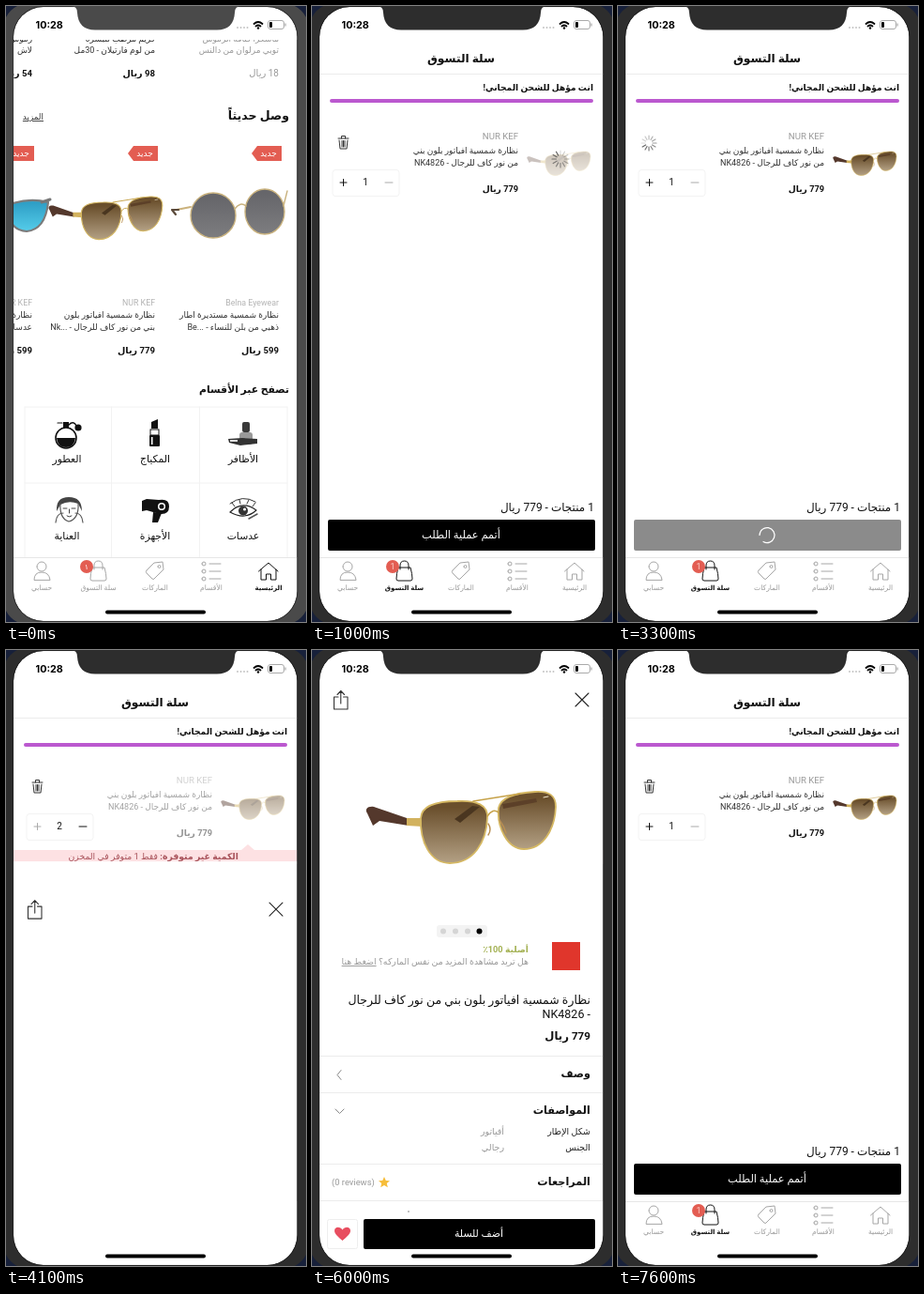
Recreate the animation shown at these times as an HTML page. Size 320 by 656 pixels, loop 8 s.

```html
<!DOCTYPE html>
<html lang="ar">
<head>
<meta charset="utf-8">
<title>سلة التسوق</title>
<style>
html, body { margin: 0; width: 100%; height: 100%; overflow: hidden; background: #2d2d2d; }
svg { display: block; width: 100vw; height: 100vh; }
text { font-family: Roboto, 'DejaVu Sans', sans-serif; direction: rtl; }
.ltr { direction: ltr; }
.end { text-anchor: end; }
.mid { text-anchor: middle; }
.b { font-weight: 700; }
.clock { font-family: Inter, sans-serif; font-weight: 700; }
.line { fill: none; stroke-linecap: round; stroke-linejoin: round; }
</style>
</head>
<body>
<svg id="stage" viewBox="0 0 320 656" fill="#111"></svg>
<script>
const LOOP = 8000;
const GREY = '#999', RED = '#e35d52', RULE = '#ececec';

// Right-aligned Arabic text unless a class says otherwise.
const text = (x, y, size, str, cls = '', fill = '#111') =>
  `<text x="${x}" y="${y}" font-size="${size}" class="${cls}" fill="${fill}">${str}</text>`;
const line = (d, color = '#111', width = 1) =>
  `<path class="line" d="${d}" stroke="${color}" stroke-width="${width}"/>`;
const shape = (d, fill) => `<path d="${d}" fill="${fill}"/>`;
const rect = (x, y, w, h, fill, r = 0, more = '') =>
  `<rect x="${x}" y="${y}" width="${w}" height="${h}" rx="${r}" fill="${fill}" ${more}/>`;
const circle = (x, y, r, fill, more = '') =>
  `<circle cx="${x}" cy="${y}" r="${r}" fill="${fill}" ${more}/>`;
const group = (id, body) => `<g id="${id}">${body}</g>`;

const gradient = (id, top, bottom) => `<linearGradient id="${id}" x1="0" y1="0" x2="0" y2="1">
  <stop offset=".1" stop-color="${top}"/><stop offset="1" stop-color="${bottom}"/></linearGradient>`;

function spinner(id, x, y, r) {
  let ticks = '';
  for (let i = 0; i < 12; i++) {
    ticks += `<path d="M0 ${-r * .5}V${-r}" stroke="#555" stroke-width="1.2" stroke-linecap="round"
      opacity="${.2 + .7 * i / 11}" transform="rotate(${i * 30})"/>`;
  }
  return `<g id="${id}"><g transform="translate(${x} ${y})"><g class="turn">${ticks}</g></g></g>`;
}

function aviator(x, y, scale) {
  const left = 'M116 178C117 164 134 160 155 160C176 159 188 164 187 178C186 204 172 226 147 226C126 226 115 203 116 178Z';
  const right = 'M199 167C202 155 220 151 238 150C253 149 260 154 260 166C259 190 247 211 226 211C208 211 197 187 199 167Z';
  const arms = shape('M104 179L66 166C59 165 56 169 59 173L65 186L72 181L103 186Z', '#54382c') +
    shape('M101 178L118 178V187L101 186Z', '#d2b25e');
  const lenses = [left, right].map(d => shape(d, 'url(#brown)')).join('');
  const inner = shape('M152 179L171 165L179 166L158 183Z', '#4a3620') +
    shape('M203 163L239 157L240 161L204 168Z', '#5c4028');
  const frame = [left, right].map(d => line(d, '#d5b863', 1.8)).join('') +
    line('M172 160L222 152M187 176Q193 167 199 172', '#c6a24a', 1.6) +
    line('M188 184Q192 190 188 196M200 180Q205 187 207 194', '#b98f52', 1.4) +
    line('M247 156L252 155', '#f4ead0', 1);
  return `<g transform="translate(${x} ${y}) scale(${scale}) translate(-57 -150)">${arms}${lenses}${inner}${frame}</g>`;
}

const roundGlasses = () =>
  line('M197 214L182 217', '#cbb27c', 1.8) + line('M184 217L177 217L181 222', '#5b4a3a', 2.2) +
  circle(221, 223, 24, 'url(#smoke)', 'stroke="#c9b27e" stroke-width="1.4"') +
  `<ellipse cx="276" cy="219" rx="21" ry="24" fill="url(#smoke)" stroke="#c9b27e" stroke-width="1.4"/>` +
  line('M244 216Q250 208 256 213M296 213L300 197', '#c9b27e', 1.4);

const blueGlasses = () =>
  shape('M4 212Q25 203 45 209Q42 238 22 240Q6 239 2 222Z', 'url(#sea)') +
  line('M4 211Q25 204 45 209Q42 238 22 240Q6 239 2 222', '#7c7b7b', 2.2) + line('M38 209L47 206', '#777', 3);

function tabs(active, badge) {
  const names = ['الرئيسية', 'الأقسام', 'الماركات', 'سلة التسوق', 'حسابي'];
  const icons = [
    'M269.5 602L280 593L290 602M272 600V611H277.5V605H282.5V611H288V600',
    'M209 594a2 2 0 1 0 4 0a2 2 0 1 0-4 0M209 602a2 2 0 1 0 4 0a2 2 0 1 0-4 0M209 610a2 2 0 1 0 4 0a2 2 0 1 0-4 0M217 594H229M217 602H229M217 610H229',
    'M150 601L158 593L167 592L168 600L158 610Q157 611 156 610L150 604Q148.5 602.5 150 601M162 597a1.5 1.5 0 1 0 3 0a1.5 1.5 0 1 0-3 0',
    'M92 598H105Q107 605 107 610Q107 612 105 612H92Q90 612 90 610Q90 605 92 598M94 600V596Q94 591 98.5 591T103 596V600',
    'M33 597a5 5 0 1 0 10 0a5 5 0 1 0-10 0M30 611Q30 603 38 603T47 611Z'];
  const items = names.map((name, i) => {
    const on = i === active, x = [280, 219, 159, 98.5, 38][i];
    return line(icons[i], on ? '#111' : '#a6a6a6') +
      text(x, 622, on ? 7 : 7.6, name, on ? 'mid b' : 'mid', on ? '#111' : GREY);
  }).join('');
  return rect(8, 587, 303, 69, '#fff') + rect(8, 587, 303, 1, '#e6e6e6') + items +
    circle(86, 597, 7, RED) + badge;
}

function categoryIcons() {
  const polish = rect(252, 443, 8, 11, '#3a3a3a', 2) + rect(249, 454, 14, 13, '#999', 3) +
    shape('M237 461L252 460L268 461V466L250 468L238 465Z', '#333') + rect(239, 462, 8, 2, '#ddd');
  const lipstick = shape('M155 450V443L162 440V450Z', '#111') + rect(154, 451, 9, 6, '#fff', 0, 'stroke="#111"') +
    rect(153, 457, 11, 12, '#111', 1) + rect(155, 459, 1.5, 8, '#fff');
  const perfume = circle(64, 460, 11, '#fff', 'stroke="#111" stroke-width="1.6"') +
    shape('M54 460H74Q73 470 64 470T54 460Z', '#111') + rect(61, 443, 6, 6, '#111') +
    line('M67 446Q72 441 75 447', '#111', 1.5) + circle(77, 449, 3.6, '#111') + line('M55 444H60', '#111', 1.2);
  const eye = line('M239 539Q252 526 267 537Q255 548 239 539', '#222', 1.2) + circle(253, 537.5, 5, '#333') +
    circle(254.5, 536, 1.5, '#fff') + line('M239 530Q252 520 266 528M244 533L241 529M250 530L249 526M257 530L259 526M263 533L266 529', '#333') +
    line('M259 546L268 541', '#555', 1.5);
  const dryer = shape('M145 527L150 525L163 526Q174 524 174 533T164 541L150 537L145 538Z', '#111') +
    shape('M157 539L166 540L162 550H156Z', '#111') + circle(166, 533, 4, '#fff') + circle(166, 533, 2.5, '#111');
  const face = shape('M54 538Q53 523 67 523T81 538L77 530Q67 526 58 531Z', '#444') +
    line('M58 530Q57 546 67 549Q78 546 77 530M53 550Q54 540 61 540M82 550Q81 540 74 540', '#555', 1.2) +
    line('M61 535H65M70 535H74M65 543Q67 545 70 543M67.5 536V540', '#444');
  return polish + lipstick + perfume + eye + dryer + face;
}

function home() {
  const tag = x => shape(`M${x} 157L${x + 6} 149H${x + 32}V165H${x + 6}Z`, RED) +
    text(x + 18, 160, 9, 'جديد', 'mid', '#fff');
  const card = (x, brand, first, second, price) =>
    text(x, 319, 8.8, brand, 'ltr end', '#b4b4b4') + text(x, 332, 9, first, '', '#333') +
    text(x, 345, 9, second, '', '#333') + text(x, 370, 9.6, price, 'b');
  const cells = [['الأظافر', 'المكياج', 'العطور'], ['عدسات', 'الأجهزة', 'العناية']];
  const labels = cells.map((row, r) => row.map((name, c) =>
    text([253, 159, 65][c], 486 + r * 82, 10.8, name, 'mid')).join('')).join('');
  return rect(0, 0, 320, 656, '#fff') +
    text(291, 38, 9, 'ماسكرا كثافة الرموش', '', GREY) + text(159, 38, 9, 'كريم مرطب للبشرة', '', '#333') + text(28, 38, 9, 'رموش', '', '#333') +
    rect(8, 0, 303, 36, '#fff') +
    text(291, 50, 9, 'توبي مرلوان من دالنس', '', GREY) + text(159, 50, 9, 'من لوم فارتيلان - 30مل', '', '#333') + text(28, 50, 9, 'لاش', '', '#333') +
    text(291, 75, 10, '18 ريال', '', GREY) + text(159, 75, 9.6, '98 ريال', 'b') + text(28, 75, 9.6, '54 ريال', 'b') +
    text(302, 121, 12.6, 'وصل حديثاً', 'b') +
    text(40, 121, 8.8, '<tspan text-decoration="underline">المزيد</tspan>', '', '#333') +
    tag(262) + tag(130) + tag(-2) + roundGlasses() + aviator(45, 203, .6) + blueGlasses() +
    card(291, 'Belna Eyewear', 'نظارة شمسية مستديرة اطار', 'ذهبي من بلن للنساء - Be...\u200e', '599 ريال') +
    card(159, 'NUR KEF', 'نظارة شمسية افياتور بلون', 'بني من نور كاف للرجال - Nk...\u200e', '779 ريال') +
    card(28, 'NUR KEF', 'نظارة شمسية', 'عدسات زرقاء', '599 ريال') +
    text(302, 412, 10.8, 'تصفح عبر الأقسام', 'b') +
    line('M20 427H300M20 508H300M20 427V587M112.5 427V587M206.5 427V587M300 427V587', '#f2f2f2') +
    categoryIcons() + labels + tabs(0, text(86, 600, 8, '١', 'mid', '#fff'));
}

function cart() {
  const item = text(220, 142, 9.6, 'NUR KEF', 'ltr end', GREY) +
    text(220, 157, 9, 'نظارة شمسية افياتور بلون بني', '', '#333') +
    text(220, 170, 9, 'من نور كاف للرجال - NK4826', '', '#333') +
    text(220, 198, 9.2, '779 ريال', 'b') + group('thumb', aviator(229, 155, .335));
  const trash = line('M28 141H39M31.5 141V138.5H35.5V141M29 143L30 152H37L38 143M32 143.5V150M33.5 143.5V150M35 143.5V150', '#333');
  const warning = shape('M8 213H251L258 207L265 213H311V228H8Z', '#fde1e3') +
    text(248, 223, 9.3, '<tspan class="b">الكمية غير متوفرة:</tspan> فقط 1 متوفر في المخزن', '', '#a8525a');
  return rect(0, 0, 320, 656, '#fff') + text(159, 60, 12.2, 'سلة التسوق', 'mid b') + rect(8, 72, 303, 1, RULE) +
    text(300, 90, 9.1, 'انت مؤهل للشحن المجاني!', 'b') + rect(19, 99, 281, 4, '#bb58cf', 2) +
    group('item', item) + spinner('loadSpin', 265, 163, 9) +
    group('trash', trash) + spinner('trashSpin', 33, 146, 8) +
    rect(22, 174.5, 71, 28, '#fff', 3, 'stroke="#f3f3f3"') +
    `<path id="plus" class="line" d="M30 188H37M33.5 184.5V191.5"/><path id="minus" class="line" d="M78 188H86"/>` +
    '<text id="qty" x="57" y="191" font-size="10" class="mid"></text>' + group('warning', warning) +
    '<text id="total" x="301" y="538" font-size="12"></text>' +
    group('order', rect(17, 547, 285, 33, '#000', 2) + text(159, 567, 11.4, 'أتمم عملية الطلب', 'mid', '#fff')) +
    group('orderBusy', rect(17, 547, 285, 33, '#8b8b8b', 2) +
      `<g transform="translate(159 563.5)"><path class="line turn" d="M0 -8A8 8 0 1 1 -7 -4" stroke="#fff" stroke-width="1.2"/></g>`) +
    group('orderEdge', rect(18, 578.5, 284, 1, '#b9b9b9')) +
    tabs(3, '<text id="badge" x="86" y="600" font-size="9" class="mid" fill="#fbd0cb"></text>');
}

function product() {
  const bold = (y, str) => text(297, y, 11.3, str, 'b');
  const spec = (y, name, value) => text(297, y, 9.5, name, '', '#222') + text(205, y, 9.5, value, '', GREY);
  const star = 'M77 561L78.8 565L83 565.3L79.8 568.1L80.8 572.3L77 570L73.2 572.3L74.2 568.1L71 565.3L75.2 565Z';
  const details =
    rect(133, 293, 54, 13, '#f3f3f3', 3) + [140, 153, 166, 178.5].map((x, i) => circle(x, 299.5, 3, i < 3 ? '#d5d5d5' : '#000')).join('') +
    rect(256, 311, 30, 30, '#e0362c') +
    text(231, 322, 9.2, 'أصلية 100٪', 'b', '#a2b050') +
    text(231, 335, 9.4, 'هل تريد مشاهدة المزيد من نفس الماركه؟ <tspan text-decoration="underline">اضغط هنا</tspan>', '', GREY) +
    text(297, 377, 12.5, 'نظارة شمسية افياتور بلون بني من نور كاف للرجال') + text(297, 392, 12.5, '- NK4826') +
    text(297, 415, 11.7, '779 ريال', 'b') +
    [432, 471, 547, 586].map(y => rect(8, y, 303, 1, RULE)).join('') +
    bold(455, 'وصف') + bold(494, 'المواصفات') + bold(570, 'المراجعات') +
    line('M31 447.5L27 452.5L31 457.5M25 489L29.5 493.5L34 489', '#888') +
    spec(516, 'شكل الإطار', 'أفياتور') + spec(533, 'الجنس', 'رجالي') +
    shape(star, '#f6bd3a') + text(21, 570, 9.4, '(0 reviews)', 'ltr', GREY) + circle(103, 598, .8, '#777');
  const heart = 'M32.5 629C28 625 24 622 24 618.5C24 614 30 613.5 32.5 617.5C35 613.5 41 614 41 618.5C41 622 37 625 32.5 629Z';
  return rect(0, 2, 320, 660, '#fff') +
    line('M281 46L295 60M295 46L281 60', '#222', 1.1) +
    line('M28 50H23.5V63H38V50H33.5M30.75 57V44M27 47.5L30.75 43.5L34.5 47.5', '#333', 1.1) +
    group('details', details) + group('photo', aviator(57, 151, 1)) +
    rect(16.5, 606.5, 32, 31, '#fff', 2, 'stroke="#eee"') + shape(heart, '#e84e60') +
    rect(55, 606, 247, 32, '#000', 2) + text(178, 625, 10.8, 'أضف للسلة', 'mid', '#fff');
}

const chrome = () =>
  '<path d="M0 0H320V656H0ZM40 1A32 32 0 0 0 8 33V623A32 32 0 0 0 40 655H278A32 32 0 0 0 310.5 623V33A32 32 0 0 0 278 1Z" fill="currentColor" fill-rule="evenodd"/>' +
  rect(7.6, .6, 303.3, 654.8, 'none', 32, 'stroke="#161616" stroke-opacity=".5"') +
  '<path d="M69 0Q76 0 76 7Q77 25.5 95 25.5H225Q243 25.5 244 7Q244 0 251 0Z" fill="currentColor"/>' +
  shape('M0 0H12Q4 4 0 12ZM320 0V12Q316 4 308 0ZM0 656V644Q4 652 12 656ZM320 656H308Q316 652 320 644Z', '#17203a') +
  text(31.5, 24, 10.8, '10:28', 'ltr clock', '#000') +
  [247, 250.5, 254, 257.5].map(x => circle(x, 23, 1, '#c4c4c4')).join('') +
  line('M264.5 19Q269 15 273.5 19M266.5 21.5Q269 19.5 271.5 21.5', '#000', 1.8) + circle(269, 23.5, 1.2, '#000') +
  rect(279.5, 15.5, 17, 9, '#fff', 2.5, 'stroke="#aaa"') + rect(281, 17, 3, 6, '#000', 1) + rect(297.5, 18.5, 1.2, 3, '#aaa') +
  rect(106, 643.5, 107, 4, '#000', 2);

const stage = document.getElementById('stage');
stage.innerHTML = `<defs>${gradient('brown', '#6a4f2c', '#b3a084')}${gradient('smoke', '#66666a', '#7d7d80')}${gradient('sea', '#2f9fc6', '#55cdea')}
  <clipPath id="screen">${rect(8, 1, 302.5, 654, '#fff', 32)}</clipPath></defs>
  <g clip-path="url(#screen)">${group('home', home())}${group('cart', cart())}${group('product', product())}</g>${chrome()}`;

const ids = {};
stage.querySelectorAll('[id]').forEach(el => ids[el.id] = el);
const turning = stage.querySelectorAll('#trashSpin .turn, #orderBusy .turn');

const ramp = (t, from, to) => Math.min(1, Math.max(0, (t - from) / (to - from)));
const easeOut = u => 1 - (1 - u) ** 3;
const show = (id, on) => ids[id].setAttribute('display', on ? 'inline' : 'none');
const fade = (id, value) => ids[id].setAttribute('opacity', value);

function draw(t) {
  const bezel = Math.round(74 - 29 * ramp(t, 0, 900));
  stage.style.color = `rgb(${bezel},${bezel},${bezel})`;
  show('home', t < 1000);
  show('cart', t >= 1000);

  const adding = t >= 3300 && t < 3500;
  const removing = t >= 6700 && t < 7200;
  const short = t >= 3500 && t < 7200;
  const dim = ramp(t, 3400, 3600) - ramp(t, 7100, 7400);
  fade('thumb', .3 + .7 * ramp(t, 1400, 1700));
  fade('item', 1 - .55 * dim);
  show('loadSpin', t < 1600);
  show('trash', !adding && !removing);
  show('trashSpin', adding || removing);
  show('order', !adding && !short);
  show('orderBusy', adding);
  show('orderEdge', short);
  show('warning', short);
  const angle = Math.floor(Math.min(t, 6800) / 100) * 30;
  turning.forEach(el => el.setAttribute('transform', `rotate(${angle})`));

  const count = short ? 2 : 1;
  ids.qty.textContent = ids.badge.textContent = count;
  ids.total.textContent = `${count} منتجات - ${(count * 779).toLocaleString('en-US')} ريال`;
  ids.plus.setAttribute('stroke', short ? '#aaa' : '#111');
  ids.minus.setAttribute('stroke', short ? '#111' : '#aaa');

  const opened = easeOut(ramp(t, 3950, 4450)), closed = easeOut(ramp(t, 6050, 6346));
  show('product', opened > 0 && closed < 1);
  ids.product.setAttribute('transform', `translate(0 ${656 * (1 - opened + closed)})`);
  fade('details', ramp(t, 4650, 4850));
  fade('photo', ramp(t, 4900, 5400));
}

const start = performance.now();
function tick() {
  draw((performance.now() - start) % LOOP);
  requestAnimationFrame(tick);
}
tick();
</script>
</body>
</html>
```
